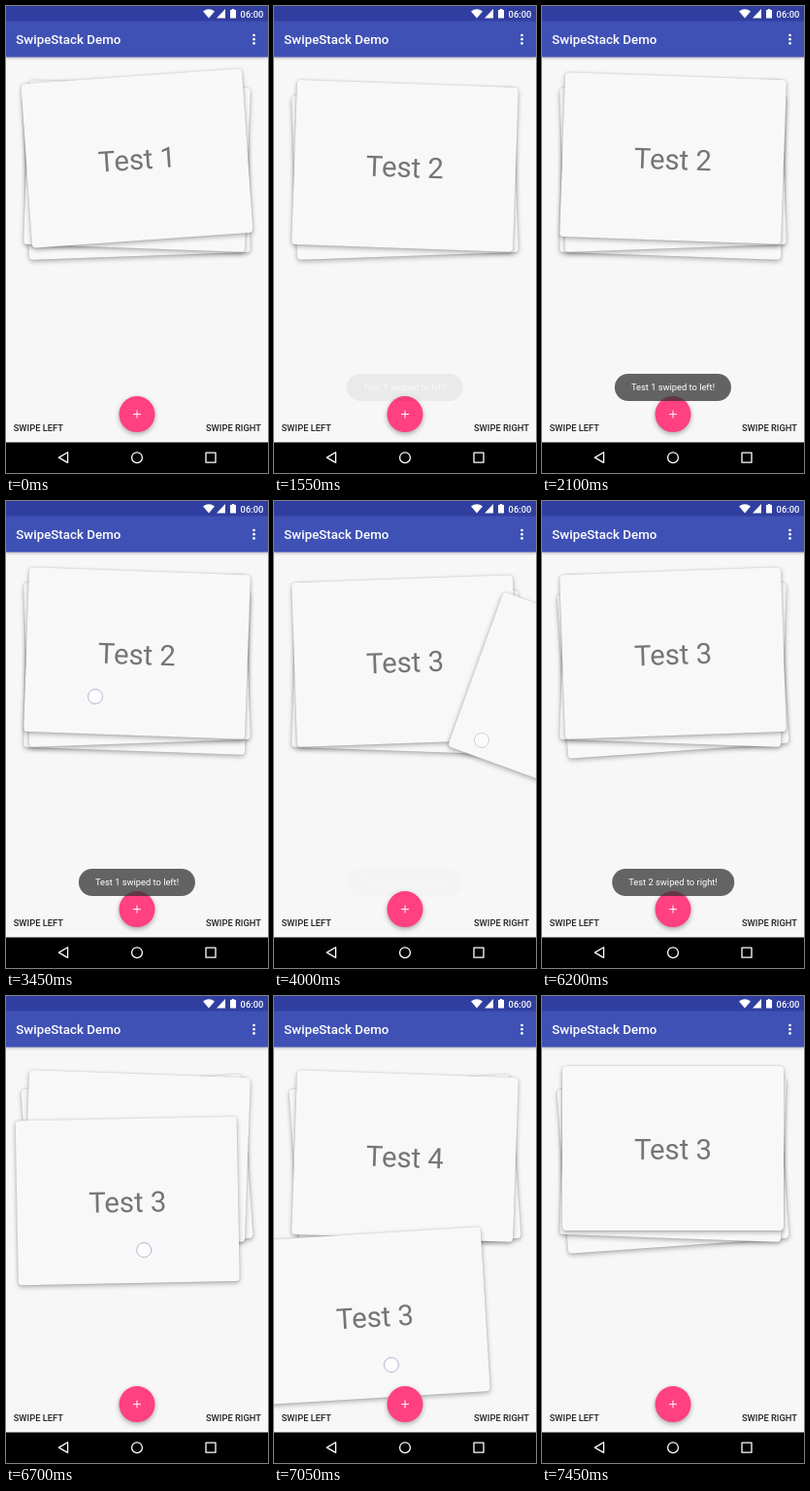
Animation of 270 by 480 pixels, one loop 8000 ms. Source, as an HTML page:

```html
<!DOCTYPE html>
<html lang="en">
<head>
<meta charset="utf-8">
<title>SwipeStack Demo</title>
<style>
  html, body { margin: 0; width: 100%; height: 100%; overflow: hidden; background: #f7f7f7; }
  body { position: relative; font-family: Roboto, sans-serif; }
  .card {
    position: absolute; left: 21px; top: 72px; width: 228px; height: 169px;
    border-radius: 4px; background: #f8f8f8; color: #757575;
    box-shadow: 0 2px 5px rgba(0, 0, 0, .3), 0 0 2px rgba(0, 0, 0, .16);
    font-size: 29.3px; line-height: 172px; text-align: center;
  }
  svg { position: absolute; left: 0; top: 0; }
  text { font-weight: 500; }
  .bar { filter: drop-shadow(0 1.5px 1.5px rgba(0, 0, 0, .28)); }
  .fab { filter: drop-shadow(0 2px 2.5px rgba(0, 0, 0, .32)); }
  #toast {
    position: absolute; left: 50%; top: 378px; height: 28px; padding: 0 17px;
    transform: translateX(-50%); border-radius: 14px; white-space: nowrap;
    background: rgba(50, 50, 50, .75); color: #fff; font-size: 9.33px; line-height: 28px;
  }
  #touch {
    position: absolute; left: -8px; top: -8px; width: 14px; height: 14px;
    border: 1px solid #b4b4d6; border-radius: 50%; background: rgba(255, 255, 255, .8);
  }
</style>
</head>
<body>
<div id="stack"></div>
<svg width="270" height="480" viewBox="0 0 270 480">
  <rect class="bar" y="15" width="270" height="37.5" fill="#3f51b5"/>
  <rect width="270" height="15.5" fill="#303f9f"/>
  <g fill="#fff">
    <path d="M203 5.6Q209 1 215 5.6L209 12.5ZM226 3V12.5H217ZM231 4H232.8V3H235.2V4H237V12.5H231Z"/>
    <text x="265.3" y="11.6" font-size="9.33" text-anchor="end">06:00</text>
    <text x="10.3" y="38.8" font-size="13.33">SwipeStack Demo</text>
    <circle cx="255.5" cy="30" r="1.35"/>
    <circle cx="255.5" cy="34.2" r="1.35"/>
    <circle cx="255.5" cy="38.4" r="1.35"/>
  </g>
  <g font-size="9.33" fill="#212121">
    <text x="7.7" y="436.5">SWIPE LEFT</text>
    <text x="263" y="436.5" text-anchor="end">SWIPE RIGHT</text>
  </g>
  <circle class="fab" cx="135" cy="419.6" r="18.5" fill="#ff4081"/>
  <path d="M131 419.6H139M135 415.6V423.6" stroke="#fff"/>
  <rect y="448.5" width="270" height="31.5"/>
  <g fill="none" stroke="#fff" stroke-width="1.3" stroke-linejoin="round">
    <path d="M63.6 458.8V469.4L54.4 464.1Z"/>
    <circle cx="135" cy="464.2" r="5.4"/>
    <rect x="206" y="459.2" width="10" height="10"/>
  </g>
</svg>
<div id="toast"></div>
<div id="touch"></div>
<script>
const LOOP = 8000, WIDTH = 270, SPACING = 8, MAX_TILT = 30;
const SWIPE = 180, SETTLE = 300, FADE = 500, TOAST_LIFE = 1975;

const tilts = [-4, 2, -2, 2, -4];
// One gesture per card: finger times, card travel, finger path, outcome.
const gestures = [
  { down: 1050, move: 1120, up: 1350, travel: [-150, 20], from: [195, 200], to: [45, 220], side: -1 },
  { down: 3450, move: 3500, up: 4000, travel: [180, 55], from: [92, 201], to: [214, 246], side: 1 },
  { down: 6250, move: 6400, up: 7110, travel: [-35.4, 196], from: [152, 207], to: [116.6, 403], side: 0 },
];
const swipes = gestures.filter(g => g.side).map((g, i) => ({
  start: g.up + SWIPE,
  label: `Test ${i + 1} swiped to ${g.side < 0 ? 'left' : 'right'}!`,
}));

const clamp = x => Math.min(1, Math.max(0, x));
const mix = (a, b, k) => a + (b - a) * k;
const smooth = x => (1 - Math.cos(Math.PI * clamp(x))) / 2;
const overshoot = x => { const u = clamp(x) - 1; return u * u * (2.4 * u + 1.4) + 1; };
const dragAmount = (g, t) => clamp((t - g.move) / (g.up - g.move)) ** 1.5;

const toast = document.getElementById('toast');
const touch = document.getElementById('touch');
const cards = tilts.map((_, i) => {
  const card = document.createElement('div');
  card.className = 'card';
  card.textContent = `Test ${i + 1}`;
  document.getElementById('stack').prepend(card);
  return card;
});

function cardPose(i, t) {
  const g = gestures[i];
  if (!g || t <= g.move) return { x: 0, y: 0, tilt: tilts[i], alpha: 1 };
  const k = dragAmount(g, t);
  const x = g.travel[0] * k, y = g.travel[1] * k, tilt = MAX_TILT * x / WIDTH;
  if (g.side) {
    const out = smooth((t - g.up) / SWIPE);
    return { x: x + g.side * WIDTH * out, y, tilt: mix(tilt, g.side * MAX_TILT, out), alpha: 1 - out };
  }
  const rest = 1 - overshoot((t - g.up) / SETTLE);
  return { x: x * rest, y: y * rest, tilt: tilt * rest, alpha: 1 };
}

function draw(t) {
  const shift = swipes.reduce((sum, s) => sum + smooth((t - s.start) / SETTLE), 0);
  cards.forEach((card, i) => {
    const depth = Math.max(0, i - shift);
    const pose = cardPose(i, t);
    const y = pose.y + Math.min(depth, 2) * SPACING;
    card.style.transform = `translate(${pose.x}px, ${y}px) rotate(${pose.tilt}deg)`;
    card.style.opacity = pose.alpha * clamp(3 - depth);
  });

  const shown = swipes.findLast(s => t >= s.start);
  toast.textContent = shown ? shown.label : '';
  const age = shown ? t - shown.start : 0;
  const enter = 1 - (1 - clamp(age / FADE)) ** 2;
  const leave = 1 - clamp((age - TOAST_LIFE) / FADE) ** 2;
  toast.style.opacity = enter * leave;

  const g = gestures.findLast(item => t >= item.down);
  touch.style.opacity = g ? clamp((g.up + 90 - t) / 150) : 0;
  if (g) {
    const [x, y] = g.from.map((start, axis) => mix(start, g.to[axis], dragAmount(g, t)));
    touch.style.transform = `translate(${x}px, ${y}px)`;
  }
}

const begin = performance.now();
function frame() {
  draw((performance.now() - begin) % LOOP);
  requestAnimationFrame(frame);
}
frame();
</script>
</body>
</html>
```
